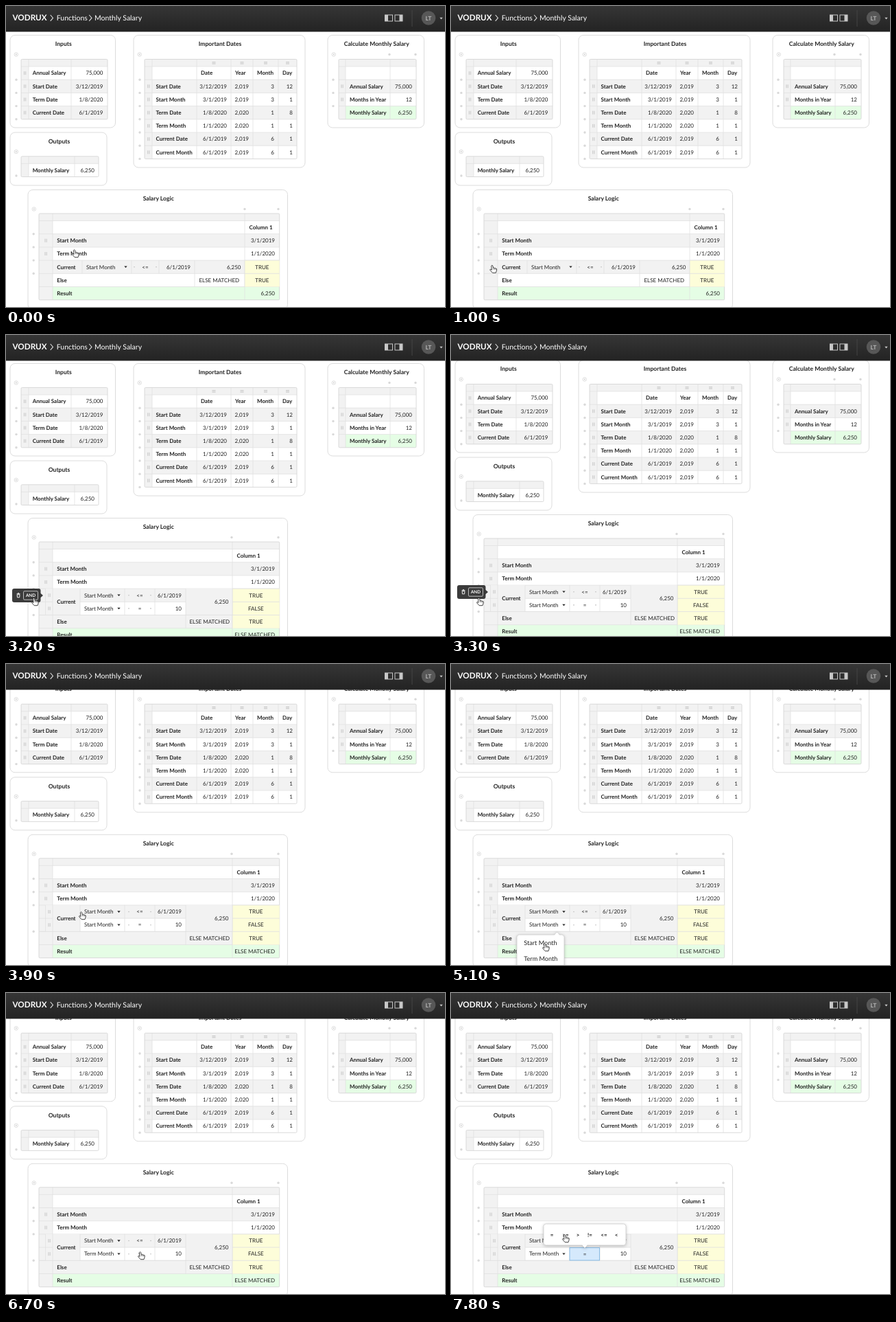
Write an HTML page that moves like this. It is 640 px wide and 438 px high and loops after 8000 ms.

```html
<!DOCTYPE html>
<html lang="en">
<head>
<meta charset="utf-8">
<title>Salary calculator</title>
<style>
  html, body { margin: 0; width: 100%; height: 100%; overflow: hidden; background: #fff; }
  svg { display: block; width: 100%; height: 100%; }
  text { font: 400 8px Lato, sans-serif; fill: #222; text-rendering: geometricPrecision; }
  .b { font-weight: 700; }
  .title { font-weight: 700; font-size: 8.6px; }
  .m { text-anchor: middle; }
  .e { text-anchor: end; }
  .crumb { font-size: 10.5px; fill: #fff; }
  .brand { font-size: 11.7px; font-weight: 700; fill: #fff; }
  .item { font-size: 9.1px; }
  .and { font-size: 6.4px; font-weight: 700; fill: #fff; }
  .user { font-size: 8.5px; font-weight: 700; fill: #b5b5b5; }
  .float { filter: drop-shadow(0 1px 2px rgba(0, 0, 0, .22)); }
</style>
</head>
<body>
<svg id="stage" viewBox="0 0 640 438"></svg>
<script>
const ROW = 19.2, HEAD = 10.5;
const GREY = '#f2f2f2', GREEN = '#e5fde5', YELLOW = '#fdfdd9', RULE = '#e1e1e1';

const rect = (x, y, w, h, fill, more = '') =>
  `<rect x="${x}" y="${y}" width="${w}" height="${h}" fill="${fill}" ${more}/>`;
const path = (d, more) => `<path d="${d}" ${more}/>`;
const rule = (x1, y1, x2, y2) =>
  path(`M${x1} ${y1}L${x2} ${y2}`, `stroke="${RULE}" stroke-width=".8"`);
const dot = (x, y, r = 1.7, fill = '#d9d9d9') => `<circle cx="${x}" cy="${y}" r="${r}" fill="${fill}"/>`;
// y is the vertical middle of the text
const text = (x, y, s, cls = '', more = '') =>
  `<text x="${x}" y="${y + 2.8}" class="${cls}" ${more}>${s.replace(/</g, '&lt;')}</text>`;
const grip = (x, y) =>
  path(`M${x - 1} ${y - 2.5}v5M${x + 1.2} ${y - 2.5}v5`, 'stroke="#b5b5b5" stroke-width=".7"');
const caret = (x, y, fill = '#222') => path(`M${x - 2.2} ${y - 1.2}h4.4l-2.2 2.6z`, `fill="${fill}"`);
const group = (id, body, cls = '') => `<g id="${id}" class="${cls}">${body}</g>`;

function card(x, y, w, h, title, tops = []) {
  return rect(x, y, w, h, '#fff', 'rx="7" stroke="#d8d8d8" stroke-width=".9"') +
    text(x + w / 2 + 1, y + 13, title, 'title m') +
    `<circle cx="${x + 8.8}" cy="${y + 28}" r="2.7" fill="none" stroke="#cfcfcf" stroke-width=".7"/>` +
    dot(x + 8.8, y + 28, 1, '#cfcfcf') +
    tops.map(tx => dot(tx, y + 28)).join('');
}

// edges: column borders, the first column holds the grips
function grid(edges, y, fills) {
  const left = edges[0], right = edges[edges.length - 1], h = HEAD + ROW * fills.length;
  let s = rect(left, y, right - left, h, GREY);
  fills.forEach((fill, i) => {
    const ry = y + HEAD + ROW * i;
    s += rect(edges[1], ry, right - edges[1], ROW, fill) + rule(left, ry, right, ry);
  });
  edges.slice(1, -1).forEach(x => s += rule(x, y, x, y + h));
  return s + rect(left, y, right - left, h, 'none', 'stroke="#d6d6d6" stroke-width=".9" rx="1.5"');
}

const mid = (y, i) => y + HEAD + ROW * (i + .5);
const gutter = (x, y, from, n) =>
  Array.from({ length: n }, (_, i) => dot(x, y + HEAD + ROW * (from + i))).join('');

function inputs() {
  const rows = [['Annual Salary', '75,000'], ['Start Date', '3/12/2019'],
                ['Term Date', '1/8/2020'], ['Current Date', '6/1/2019']];
  return card(6, 42.5, 153.5, 134.5, 'Inputs') +
    grid([22, 33, 95, 148], 77.5, ['#fff', GREY, '#fff', GREY]) + gutter(15, 77.5, 1, 4) +
    rows.map(([a, b], i) => grip(27.5, mid(77.5, i)) +
      text(38.7, mid(77.5, i), a, 'b') + text(141.5, mid(77.5, i), b, 'e')).join('');
}

function outputs() {
  const y = mid(218.8, 0);
  return card(6, 184, 141, 77, 'Outputs') +
    grid([22, 33, 100, 135], 218.8, ['#fff']) + dot(15, 247) +
    text(38.7, y, 'Monthly Salary', 'b') + text(129, y, '6,250', 'e');
}

function dates() {
  const rows = [['Start Date', '3/12/2019', '2,019', '3', '12'], ['Start Month', '3/1/2019', '2,019', '3', '1'],
    ['Term Date', '1/8/2020', '2,020', '1', '8'], ['Term Month', '1/1/2020', '2,020', '1', '1'],
    ['Current Date', '6/1/2019', '2,019', '6', '1'], ['Current Month', '6/1/2019', '2,019', '6', '1']];
  const edges = [202, 213, 278, 328, 360, 397, 424], y = 77.5;
  let s = card(186, 42.5, 250, 192.5, 'Important Dates') +
    grid(edges, y, ['#fff', ...rows.map((_, i) => i % 2 ? '#fff' : GREY)]) + gutter(195, y, 1, 7);
  ['Date', 'Year', 'Month', 'Day'].forEach((name, i) => {
    const cx = (edges[i + 2] + edges[i + 3]) / 2;
    s += text(edges[i + 2] + 6, mid(y, 0), name, 'b') +
      path(`M${cx - 2.5} 81.8h5M${cx - 2.5} 84h5`, 'stroke="#aaa" stroke-width=".7"');
  });
  rows.forEach(([name, ...values], i) => {
    const cy = mid(y, i + 1);
    s += grip(207.7, cy) + text(218.5, cy, name, 'b') +
      values.map((v, j) => text(edges[j + 3] - 6, cy, v, 'e')).join('');
  });
  return s;
}

function monthly() {
  const rows = [['Annual Salary', '75,000'], ['Months in Year', '12'], ['Monthly Salary', '6,250']];
  return card(469, 42.5, 140.5, 134.5, 'Calculate Monthly Salary', [559, 597]) +
    grid([485, 495, 560, 598], 77.5, ['#fff', GREY, '#fff', GREEN]) + gutter(477, 77.5, 1, 3) +
    rows.map(([a, b], i) => (i < 2 ? grip(490, mid(77.5, i + 1)) : '') +
      text(501, mid(77.5, i + 1), a, 'b') + text(592, mid(77.5, i + 1), b, 'e')).join('');
}

const LOGIC_Y = 302;
const logicMid = i => mid(LOGIC_Y, i);

// One comparison: field, operator, value; edges = [field, operator, value, end]
function condition(i, edges, indent, field, op, value, id = '') {
  const y = logicMid(i), top = y - ROW / 2, [a, b, c, d] = edges, cx = (b + c) / 2;
  return [a, b, c, d].map(x => rule(x, top, x, top + ROW)).join('') +
    text(a + indent, y, field, '', id && `id="${id}"`) + caret(b - 8.5, y) +
    dot(cx - 16, y, .8, '#bbb') + text(cx, y, op, 'm') + dot(cx + 16, y, .8, '#bbb') +
    text(d - 6, y, value, 'e');
}

function logic(split) {
  const col = split ? 330 : 348, right = 398.7, extra = split ? 1 : 0;
  const fills = ['#fff', GREY, '#fff', GREY, ...(split ? ['#fff', GREY] : ['#fff']), GREEN];
  const elseRow = 4 + extra, resultRow = elseRow + 1;
  const flags = split ? ['TRUE', 'FALSE', 'TRUE'] : ['TRUE', 'TRUE'];
  const edge = i => LOGIC_Y + HEAD + ROW * i;
  const box = split ? 262 : 275;
  let s = card(32, 267.5, 378.5, 174 + ROW * extra, 'Salary Logic', [split ? 329 : 348, 397]) +
    grid([48, 68, col, right], LOGIC_Y, fills) +
    [1, 2, 3, elseRow].map(i => dot(40.2, edge(i))).join('') +
    text(col + 6.5, logicMid(0), 'Column 1', 'b') +
    text(74.3, logicMid(1), 'Start Month', 'b') + text(392, logicMid(1), '3/1/2019', 'e') +
    text(74.3, logicMid(2), 'Term Month', 'b') + text(392, logicMid(2), '1/1/2020', 'e') +
    grip(58, logicMid(1)) + grip(58, logicMid(2));
  flags.forEach((flag, i) => s += rect(col, edge(3 + i), right - col, ROW, YELLOW) +
    rule(col, edge(3 + i), right, edge(3 + i)) + text((col + right) / 2, logicMid(3 + i), flag, 'm'));
  s += rule(col, edge(3), col, edge(resultRow));
  if (split) {
    s += rect(57.5, edge(3), 50.5, 2 * ROW, GREY) + rect(262, edge(3), 68, 2 * ROW, GREY) +
      [57.5, 68, 330].map(x => rule(x, edge(3), x, edge(5))).join('') +
      rule(57.5, edge(4), 68, edge(4)) + rule(48, edge(5), col, edge(5)) +
      grip(63, logicMid(3)) + grip(63, logicMid(4)) +
      condition(3, [108, 173, 217, 262], 6, 'Start Month', '<=', '6/1/2019') +
      condition(4, [108, 173, 217, 262], 6, 'Start Month', '=', '10', 'pick');
  } else {
    s += condition(3, [111, 183, 223, 275], 6, 'Start Month', '<=', '6/1/2019');
  }
  return s + text(74.3, edge(3.5 + extra / 2) , 'Current', 'b') +
    text(col - 5.5, edge(3.5 + extra / 2), '6,250', 'e') +
    rule(box, edge(elseRow), box, edge(resultRow)) +
    text(74.3, logicMid(elseRow), 'Else', 'b') + text(split ? 267.5 : 281.5, logicMid(elseRow), 'ELSE MATCHED') +
    text(74.3, logicMid(resultRow), 'Result', 'b') +
    text(392, logicMid(resultRow), split ? 'ELSE MATCHED' : '6,250', 'e');
}

function rowMenu(x, trash) {
  const bin = path('M15.6 377.7h5M17.2 376.6h1.8M16.2 378.8h3.8l-.3 4h-3.2z',
    'fill="none" stroke="#fff" stroke-width=".9"');
  return rect(x, 370, 50.5 - x, 20, '#3b3b3b', 'rx="3"') +
    path('M50 376.5l4 3.5-4 3.5z', 'fill="#3b3b3b"') + (trash ? bin : '') +
    text(36, 379.6, 'AND', 'and m');
}

function header() {
  const chevron = x => path(`M${x - 1.8} 13l3.8 4.4-3.8 4.4`, 'fill="none" stroke="#ddd" stroke-width="1.1"');
  const panel = (x, fx) => rect(x, 13, 11, 9, 'none', 'stroke="#c8c8c8" stroke-width="1"') +
    rect(fx, 13, 4.5, 9, '#c8c8c8');
  return rect(0, 0, 640, 37.5, 'url(#bar)') +
    text(9.5, 18.6, 'VODRUX', 'brand') + chevron(66.5) + text(73.8, 18.2, 'Functions', 'crumb') +
    chevron(123) + text(129, 18.2, 'Monthly Salary', 'crumb') +
    panel(552.5, 552.5) + panel(567, 573.5) + path('M592 6v24', 'stroke="#454545" stroke-width="1"') +
    dot(616, 17.5, 10.3, '#575757') + text(616, 17.7, 'LT', 'user m') + caret(634.5, 18, '#ccc');
}

const bubble = (x, y, w, h, tail) => path(tail, 'fill="#fff" stroke="#ccc" stroke-width=".8"') +
  rect(x, y, w, h, '#fff', 'rx="3.5" stroke="#ccc" stroke-width=".8"');

function operators() {
  const ops = [['=', 147], ['>=', 167], ['>', 185], ['!=', 202.5], ['<=', 223], ['<', 241]];
  return bubble(135, 336, 120, 31, 'M190.5 366.5l4.5 4.5 4.5-4.5z') +
    path('M191 366.2h8l-4 4z', 'fill="#fff"') +
    ops.map(([op, x]) => text(x, 352, op, 'b m')).join('');
}

const fieldMenu = bubble(96, 394, 69, 60, 'M150 394.5l4.5-4.5 4.5 4.5z') +
  path('M150.6 395l3.9-4 3.9 4z', 'fill="#fff"') +
  text(106.3, 406, 'Start Month', 'item') + text(106.3, 429, 'Term Month', 'item');

const hand = path('M-1 1Q0-.7 1.1 1L1.7 4.1Q3 3.3 3.7 4.4Q5 3.8 5.4 5Q6.9 4.7 6.8 6.3L6.4 8.6 5.5 11.2H.7L-2.7 7.4Q-3-.2 -3 6.4Q-2 5.6-.5 7z'
  .replace('Q-3-.2 -3 6.4', 'Q-3.2 6.6-2.6 6.1'), 'fill="#fff" stroke="#222" stroke-width=".85" stroke-linejoin="round"') +
  path('M1.9 4.3v2.2M3.7 4.6v2M5.3 5.2v1.6', 'stroke="#222" stroke-width=".6"');

const stage = document.getElementById('stage');
stage.innerHTML =
  `<defs><linearGradient id="bar" x2="0" y2="1"><stop stop-color="#363636"/>
   <stop offset="1" stop-color="#232323"/></linearGradient></defs>` +
  group('page', inputs() + outputs() + dates() + monthly() +
    group('single', logic(false)) + group('double', logic(true)) +
    group('menuSmall', rowMenu(21, false)) + group('menuWide', rowMenu(9, true)) +
    group('hover', rect(25.5, 373.8, 21, 12.4, 'none', 'rx="1.5" stroke="#ddd" stroke-width=".8"'))) +
  group('opCell', rect(173, 370.6, 43.5, 18.4, '#d5e9fc', 'stroke="#7fb5e2" stroke-width=".9"') +
    text(195, 379.9, '=', 'm')) +
  group('fields', fieldMenu, 'float') + group('ops', operators(), 'float') +
  header() + group('pulse', dot(0, 0, 20, 'rgba(0,0,0,.1)')) + group('cursor', hand);

const part = Object.fromEntries([...stage.querySelectorAll('[id]')].map(n => [n.id, n]));

// time, x, y of the fingertip
const moves = [[0, 99.5, 354.5], [100, 98, 356], [900, 60, 377], [1300, 59, 377.5], [1400, 59, 377.5],
  [1900, 40.5, 382.5], [3400, 40.5, 382.5], [3900, 109.5, 360.5], [4300, 139.5, 382], [5000, 139.5, 382],
  [5100, 136.5, 406.5], [5500, 134.5, 427], [6000, 134.5, 427], [6600, 195.5, 376.5],
  [7100, 195.5, 376.5], [7700, 166, 352.5], [7800, 165.5, 351.5], [8000, 165.5, 351.5]];
const scrolls = [[0, 0], [3100, 0], [3200, 1], [3300, 6], [3400, 13], [3500, 17.5], [3600, 19.2], [8000, 19.2]];
const spans = { single: [0, 2800], double: [2800, 8000], menuSmall: [1100, 2800], menuWide: [2800, 3500],
  hover: [1700, 3500], fields: [4500, 6000], opCell: [7100, 8000], ops: [7200, 8000] };
const clicks = [2100, 4300, 5600, 7000];

function track(keys, t) {
  const i = Math.max(1, keys.findIndex(k => k[0] > t)), a = keys[i - 1], b = keys[i];
  const u = (t - a[0]) / (b[0] - a[0]), ease = u * u * (3 - 2 * u);
  return a.slice(1).map((v, j) => v + (b[j + 1] - v) * ease);
}

const show = (id, on) => { part[id].style.display = on ? '' : 'none'; };
const start = performance.now();

function render() {
  const t = Math.floor(Math.max(0, performance.now() - start) % 8000 / 100) * 100;
  const at = `translate(${track(moves, t)})`;
  for (const id in spans) show(id, t >= spans[id][0] && t < spans[id][1]);
  show('pulse', clicks.includes(t));
  part.pulse.setAttribute('transform', at);
  part.cursor.setAttribute('transform', at);
  part.page.setAttribute('transform', `translate(0 ${-track(scrolls, t)[0]})`);
  part.pick.textContent = t < 6000 ? 'Start Month' : 'Term Month';
  requestAnimationFrame(render);
}
render();
</script>
</body>
</html>
```
